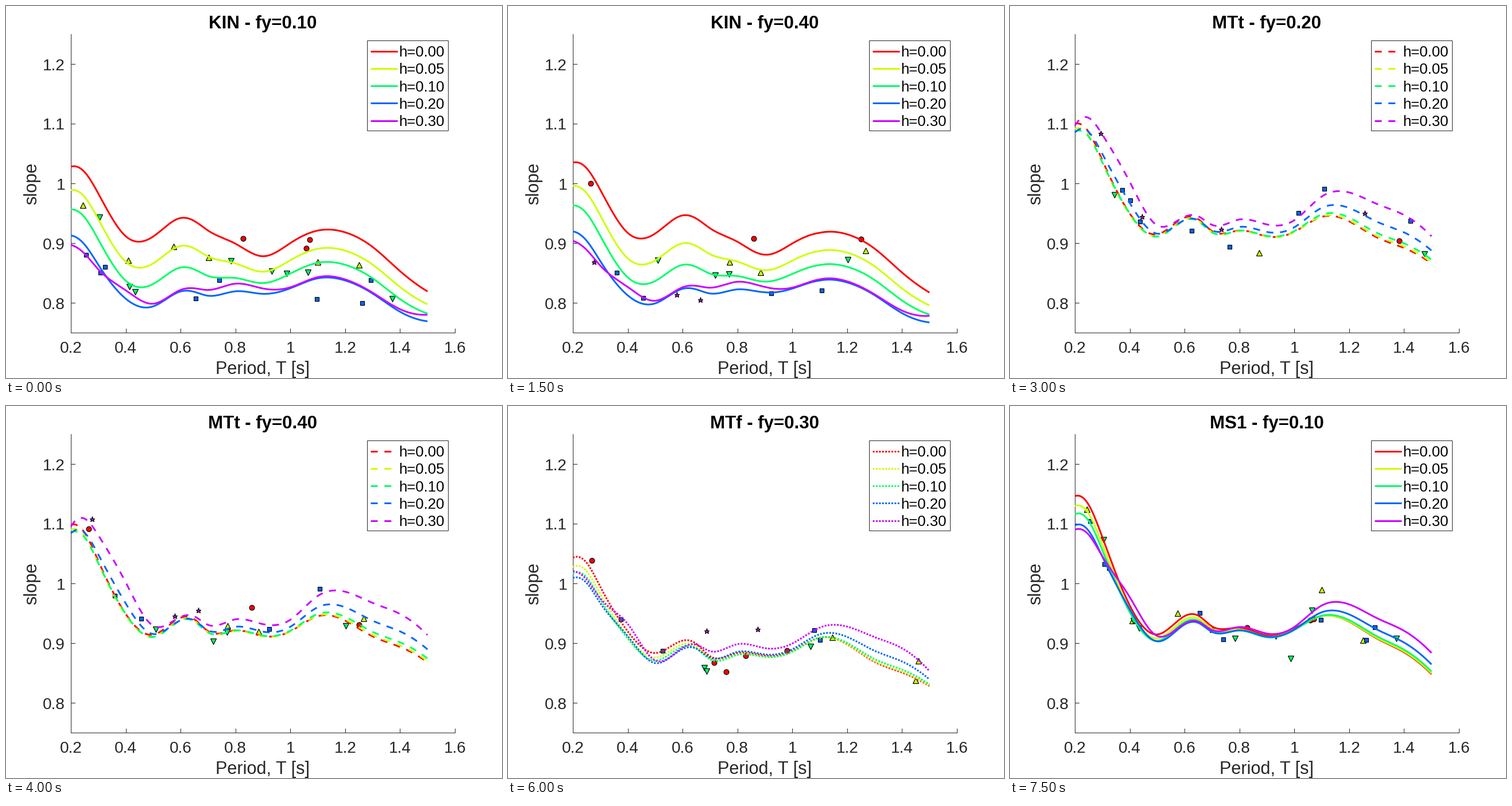
A matplotlib script that plays this animation: 864x648 px, repeating every 8 s.

```python
import random

import matplotlib.pyplot as plt
import numpy as np
from matplotlib.animation import FuncAnimation
from matplotlib.patches import Rectangle

plt.rcParams["font.family"] = "Liberation Sans"
plt.rcParams["lines.scale_dashes"] = False

W, H = 864, 648
GREY = "#262626"
HEIGHTS = [0.00, 0.05, 0.10, 0.20, 0.30]
COLORS = [(1, 0, 0), (0.8, 1, 0), (0, 1, 0.4), (0, 0.4, 1), (0.8, 0, 1)]
MARKERS = [("o", 8.8), ("^", 9.6), ("v", 9.6), ("s", 7), ("*", 9.2)]
SOLID, DASHED, DOTTED = "-", (0, (12, 11.7)), (0, (3, 2.4))
T = np.linspace(0.2, 1.5, 261)


def spline(x, y):
    """Cubic spline through (x, y) with parabolic ends, sampled at T."""
    x, y = np.array(x), np.array(y)
    n, h, slope = len(x), np.diff(x), np.diff(y) / np.diff(x)
    A, b = np.eye(n), np.zeros(n)
    A[0, 1] = A[-1, -2] = -1
    for i in range(1, n - 1):
        A[i, i - 1:i + 2] = h[i - 1], 2 * (h[i - 1] + h[i]), h[i]
        b[i] = 6 * (slope[i] - slope[i - 1])
    m = np.linalg.solve(A, b)
    k = np.clip(np.searchsorted(x, T) - 1, 0, n - 2)
    d, u, v = h[k], x[k + 1] - T, T - x[k]
    return ((m[k] * u**3 + m[k + 1] * v**3) / (6 * d)
            + (y[k] / d - m[k] * d / 6) * u + (y[k + 1] / d - m[k + 1] * d / 6) * v)


def fine(*y):
    return spline([.2, .25, .3, .4, .5, .6, .65, .7, .8, .9, 1, 1.1, 1.2, 1.3, 1.4, 1.5], y)


def coarse(*y):
    return spline([.2, .3, .4, .5, .7, .9, 1, 1.1, 1.3, 1.5], y)


# All slopes in thousandths. Base curves hold for h=0 and fy=0.1.
kin = fine(1028, 1019, 983, 911.5, 911, 942, 937, 921, 899, 878, 900, 921, 918, 893.5, 853, 819)
mtf = fine(1044.5, 1036, 995.5, 920.5, 884, 904.5, 899, 878, 883, 878.5, 886, 908, 896.5, 867, 849, 826)
mtt = mtf + coarse(56, 44, 29.5, 31, 42, 32.5, 32.5, 35.5, 42, 39)
ms1 = mtf + coarse(101.5, 82, 42.5, 30.5, 50, 34.5, 38.5, 37.5, 41, 22)

# Change of a curve from h=0 to h=0.3, and to h=0.1
kin_30 = coarse(-131, -127, -90.5, -112.5, -99.5, -54, -74, -78, -76.5, -39)
kin_10 = coarse(-71.5, -77, -74.5, -79.5, -76, -45, -51, -54, -52.5, -37)
mtt_30 = coarse(-3, 43, 53, 15, 10.5, 20, 19.5, 34, 56, 45.5)
mtf_30 = coarse(-22.5, -19.5, 12.5, -12.5, 8.5, 12.5, 12.5, 17, 41.5, 25)
ms1_30 = coarse(-56, -32, 14, -2.5, -6, 3, 2.5, 17.5, 34, 35.5)


def low_h(d30, drop):
    """Change at h=0.1: part of the full change and a drop fading with T."""
    return 0.15 * d30 - drop * np.exp(-(T - 0.2) / 0.4)


# Change of the curves from fy=0.1 to fy=0.5
kin_drift = np.interp(T, [.2, .9, 1.1, 1.5], [9, 3.5, -5, -2.5])
mt_drift = np.interp(T, [.2, .7, 1.5], [-3, 0, 4])

METHODS = [
    ("KIN", SOLID, kin, kin_10, kin_30, kin_drift),
    ("MTt", DASHED, mtt, low_h(mtt_30, 13), mtt_30, mt_drift),
    ("MTf", DOTTED, mtf, low_h(mtf_30, 23), mtf_30, mt_drift),
    ("MS1", SOLID, ms1, low_h(ms1_30, 22), ms1_30, mt_drift),
]

# Samples for each h, one row per fy; their periods are shared by all methods
COUNTS = [(3, 6, 8, 8, 0), (1, 1, 2, 8, 4), (5, 3, 3, 4, 2), (3, 3, 4, 4, 3), (2, 4, 2, 3, 5)]
rng = random.Random(12)
PERIODS = [[[rng.uniform(0.23, 1.49) for _ in range(n)] for n in row] for row in COUNTS]


def px(period):
    return 113 + (np.asarray(period) - 0.2) * 669 / 1.4


def py(slope):
    return 569 - (np.asarray(slope) - 0.75) * 1040


def build(step):
    """Title, line style, curves and samples of one step."""
    name, style, base, d10, d30, drift = METHODS[step // 5]
    fy = step % 5
    noise = random.Random(step)
    curves, samples = [], []
    for h, periods in zip(HEIGHTS, PERIODS[fy]):
        # quadratic in h through the changes at 0, 0.1 and 0.3
        change = d10 * h * (0.3 - h) / 0.02 + d30 * h * (h - 0.1) / 0.06
        curve = (base + change + drift * fy / 4) / 1000
        ys = [np.interp(t, T, curve) + np.clip(noise.gauss(0, 0.017), -0.045, 0.045)
              for t in periods]
        curves.append(py(curve))
        samples.append((px(periods), py(ys)))
    return f"{name} - fy={(fy + 1) / 10:.2f}", style, curves, samples


STEPS = [build(s) for s in range(16)]

fig = plt.figure(figsize=(W / 72, H / 72), dpi=72, facecolor="white")
ax = fig.add_axes([0, 0, 1, 1])
ax.set(xlim=(0, W), ylim=(H, 0))
ax.axis("off")


def rule(x, y):
    ax.plot(x, y, color=GREY, lw=1, zorder=1)


def label(x, y, text, size, ha="center", **kw):
    kw.setdefault("color", GREY)
    return ax.text(x, y, text, fontsize=size, ha=ha, va="baseline", **kw)


rule([113, 113], [49, 569])
rule([113, 782], [569, 569])
for v in np.arange(0.2, 1.61, 0.2):
    rule([px(v)] * 2, [569, 562])
    label(px(v), 604.5, f"{v:g}", 28)
for v in np.arange(0.8, 1.21, 0.1):
    rule([113, 120], [py(v)] * 2)
    label(103, py(v) + 10.5, f"{v:g}", 28, ha="right")
label(447, 641, "Period, T [s]", 30.6)
label(53, 309.5, "slope", 30.6, rotation=90, rotation_mode="anchor")
title = label(447.5, 38.5, "", 31.2, weight="bold", color="black")

ax.add_patch(Rectangle((629, 60), 141, 157, fc="white", ec=GREY, lw=1, zorder=4))
dots, lines, keys = [], [], []
for i, (color, (marker, size)) in enumerate(zip(COLORS, MARKERS)):
    pen = dict(color=color, lw=3, dash_capstyle="butt", solid_capstyle="butt")
    row = 78.5 + 30.3 * i
    dots += ax.plot([], [], marker, ms=size, mfc=color, mec="black", mew=1.2, zorder=2)
    lines += ax.plot([], [], zorder=3, **pen)
    keys += ax.plot([635, 681.5], [row, row], zorder=5, **pen)
    label(684.5, row + 9.5, f"h={HEIGHTS[i]:.2f}", 25.8, ha="left", color="black", zorder=5)


def update(step):
    text, style, curves, samples = STEPS[step]
    title.set_text(text)
    for dot, line, key, curve, pts in zip(dots, lines, keys, curves, samples):
        dot.set_data(*pts)
        line.set_data(px(T), curve)
        line.set_linestyle(style)
        key.set_linestyle(style)
    return [title, *dots, *lines, *keys]


anim = FuncAnimation(fig, update, frames=16, interval=500, repeat=True, repeat_delay=0)
plt.show()
```
